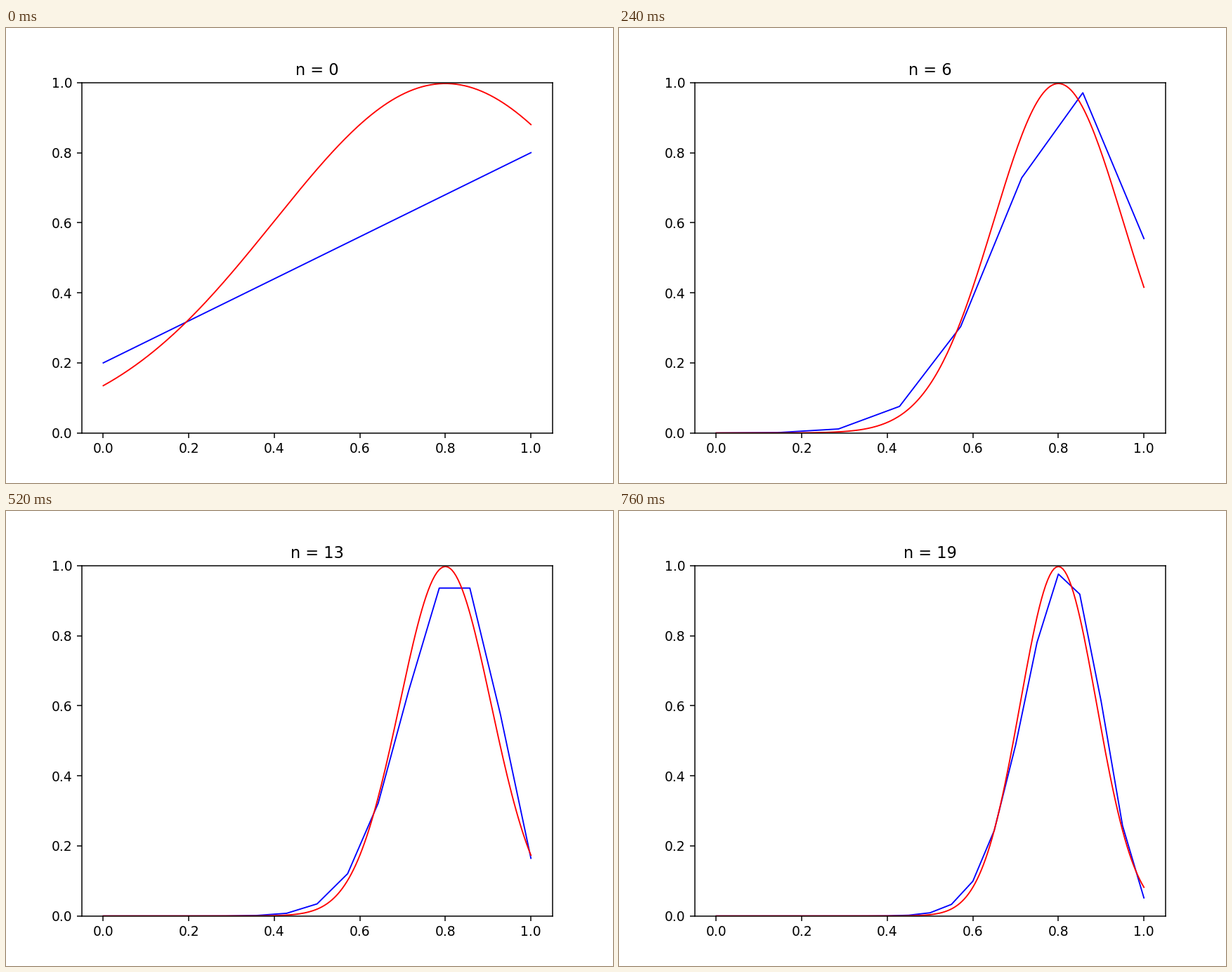
A matplotlib script for the animation above (0.8 s loop, 864 px wide and 648 px high).

```python
import math

import numpy as np
import matplotlib.pyplot as plt
from matplotlib.animation import FuncAnimation

P = 0.8
VAR = P * (1 - P)
FRAMES = 20

fig, ax = plt.subplots(figsize=(6.4, 4.8), dpi=135)
ax.set_xlim(-0.05, 1.05)
ax.set_ylim(0, 1)
title = ax.set_title("n = 0")
binom_line, = ax.plot([], [], color="blue", lw=1)
normal_line, = ax.plot([], [], color="red", lw=1)
xs = np.linspace(0, 1, 201)


def binomial(trials):
    return np.array([math.comb(trials, k) * P**k * (1 - P)**(trials - k)
                     for k in range(trials + 1)])


def normal(x, trials):
    """Limiting density, scaled by sqrt(trials) like the binomial."""
    return np.exp(-trials * (x - P)**2 / (2 * VAR)) / math.sqrt(2 * math.pi * VAR)


def update(n):
    trials = n + 1
    binom_line.set_data(np.arange(trials + 1) / trials,
                        math.sqrt(trials) * binomial(trials))
    normal_line.set_data(xs, normal(xs, trials))
    title.set_text(f"n = {n}")
    return binom_line, normal_line, title


anim = FuncAnimation(fig, update, frames=FRAMES, interval=40,
                     init_func=lambda: update(0), repeat=True, repeat_delay=0)
plt.show()
```
